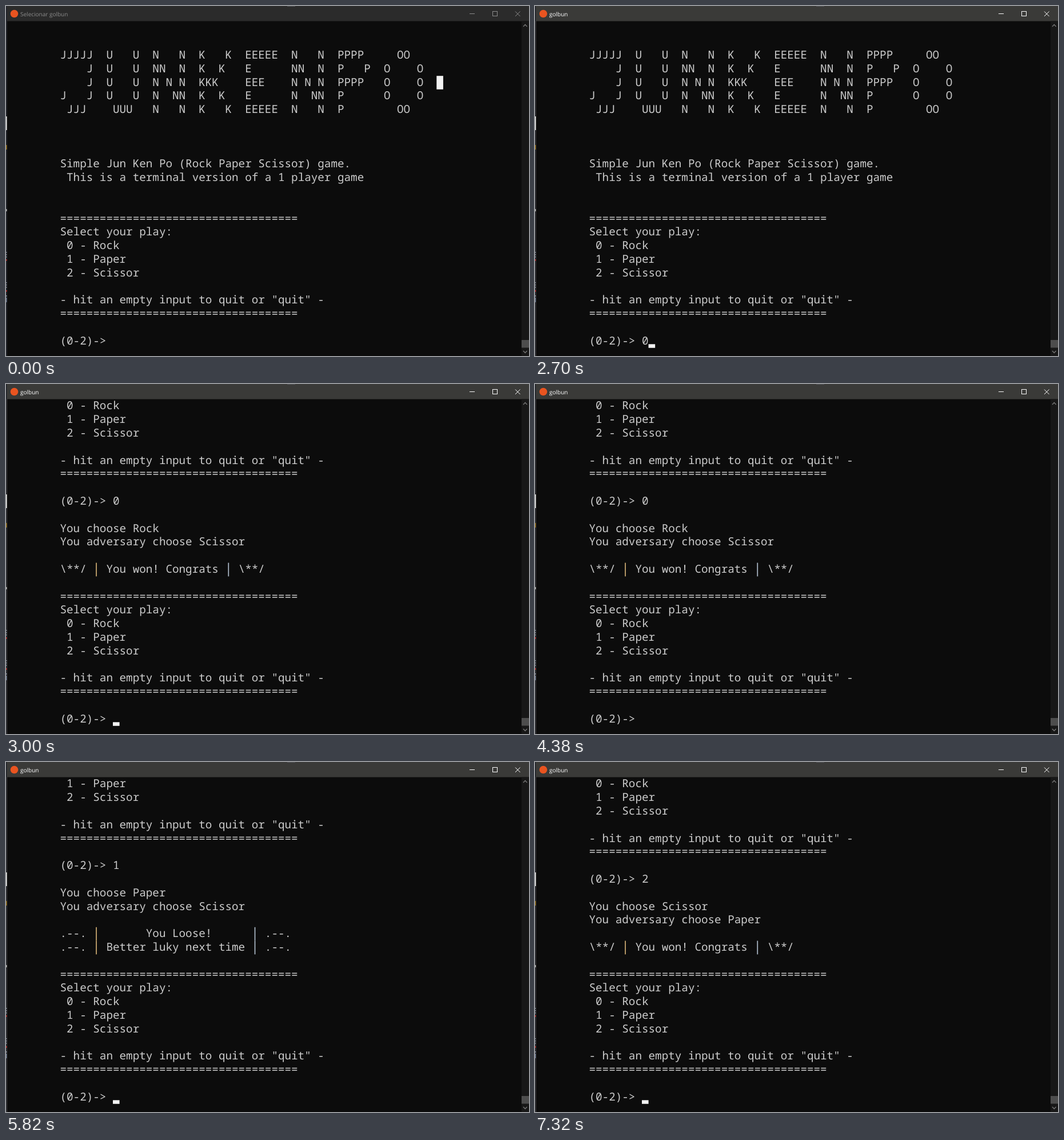
Write an HTML page that moves like this. It is 915x612 px and loops after 8000 ms.

```html
<!DOCTYPE html>
<html lang="en">
<head>
<meta charset="utf-8">
<title>Terminal game</title>
<style>
  html, body { margin: 0; width: 100%; height: 100%; overflow: hidden; background: #0c0c0c; }
  svg { display: block; width: 915px; height: 612px; }
  text { white-space: pre; text-rendering: geometricPrecision; }
  #rows text { font: 19.27px "Noto Sans Mono", monospace; fill: #ccc; }
  #title { font: 10px "Open Sans", sans-serif; }
</style>
</head>
<body>
<svg viewBox="0 0 915 612">
  <rect width="915" height="612" fill="#0c0c0c"/>
  <rect id="bar" width="915" height="26.5"/>
  <path d="M492 .5H506" stroke="#55565a"/>
  <circle cx="14.5" cy="13.5" r="6.8" fill="#e95420"/>
  <text id="title" x="25" y="17.6"></text>
  <g id="buttons" fill="none">
    <path d="M811 13.5H820"/>
    <rect x="851.5" y="9.5" width="8" height="8"/>
    <path d="M891 9.5L899.5 18M899.5 9.5L891 18"/>
  </g>

  <rect x="902" y="26.5" width="13" height="585.5" fill="#171717"/>
  <rect x="902" y="584" width="13" height="13.5" fill="#4d4d4d"/>
  <path d="M905 36L908.3 32.5L911.6 36M905 603L908.3 606.5L911.6 603" fill="none" stroke="#777" stroke-width="1.3"/>

  <rect width="1.5" height="612" fill="#20222b"/>
  <rect id="edge" x="1" y="26" width="1" height="586"/>
  <g id="behind"></g>

  <g id="rows"></g>
  <rect id="block" x="753.3" y="122.2" width="11.6" height="23.6" fill="#f2f2f2"/>
  <rect id="caret" y="591.3" width="11.6" height="6.5" fill="#f2f2f2"/>
  <path id="mouse" d="M.5 .5V10.2L2.7 8.2L4.2 11.6L5.8 10.9L4.3 7.7H7.2Z" fill="#fff" stroke="#000" stroke-width=".6"/>
</svg>
<script>
const NS = "http://www.w3.org/2000/svg";
const LOOP = 8000, COLS = 11.562, LINE = 23.8, LEFT = 2, TOP = 27, ROWS = 24, INDENT = 8;
const $ = id => document.getElementById(id);

function add(parent, tag, attrs) {
  const el = document.createElementNS(NS, tag);
  for (const k in attrs) el.setAttribute(k, attrs[k]);
  return parent.appendChild(el);
}
const show = (id, on) => $(id).setAttribute("visibility", on ? "visible" : "hidden");
const colX = c => LEFT + c * COLS;

// slivers of the window behind, along the left edge: [y, height, colour]
[[193, 24, "#f0f0f0"], [243, 8, "#9a7420"], [355, 4, "#b8b8b8"],
 [430, 1.5, "#8a93a5"], [434, 1.5, "#8a93a5"], [438, 1.5, "#8a93a5"], [443, 2.5, "#d03030"],
 [483, 1.5, "#8a93a5"], [487, 1.5, "#8a93a5"], [491, 1.5, "#8a93a5"], [497, 2.5, "#d03030"],
 [506, 2, "#8a93a5"], [510, 8, "#6f7c94"]
].forEach(([y, height, fill]) => add($("behind"), "rect", { x: 0, y, width: 1.5, height, fill }));

const rule = "=".repeat(36);
const intro = ["", "",
  "JJJJJ  U   U  N   N  K   K  EEEEE  N   N  PPPP     OO",
  "    J  U   U  NN  N  K  K   E      NN  N  P   P  O    O",
  "    J  U   U  N N N  KKK    EEE    N N N  PPPP   O    O",
  "J   J  U   U  N  NN  K  K   E      N  NN  P      O    O",
  " JJJ    UUU   N   N  K   K  EEEEE  N   N  P        OO",
  "", "", "",
  "Simple Jun Ken Po (Rock Paper Scissor) game.",
  " This is a terminal version of a 1 player game",
  "", ""];
const menu = [rule, "Select your play:", " 0 - Rock", " 1 - Paper", " 2 - Scissor", "",
  "- hit an empty input to quit or \"quit\" -", rule, "", "(0-2)-> "];
const won = ["\\**/ | You won! Congrats | \\**/"];
const lost = [".--. |       You Loose!      | .--.", ".--. | Better luky next time | .--."];

const typed = (log, key) => [...log.slice(0, -1), log[log.length - 1] + key];
const result = (log, mine, other, banner) =>
  [...log, "", "You choose " + mine, "You adversary choose " + other, "", ...banner, "", ...menu];

const start = [...intro, ...menu];
const rock = typed(start, "0");
const round2 = result(rock, "Rock", "Scissor", won);
const paper = typed(round2, "1");
const round3 = result(paper, "Paper", "Scissor", lost);
const scissor = typed(round3, "2");
const round4 = result(scissor, "Scissor", "Paper", won);

const views = [[0, start], [2700, rock], [2940, [...rock, ""]], [3000, round2],
  [5580, paper], [5820, round3], [7140, scissor], [7320, round4]];
const blinks = [1200, 1560, 1980, 2340, 2700, 3600, 4020, 4380, 4800, 5160, 5580, 6420, 6840];

let shown;
function drawLog(log) {
  if (log === shown) return;
  shown = log;
  const rows = $("rows");
  rows.textContent = "";
  log.slice(-ROWS).forEach((line, r) => {
    const y = TOP + r * LINE;
    const pad = line.length - line.trimStart().length;
    const t = add(rows, "text", { x: colX(INDENT + pad), y: y + 17.3 });
    t.textContent = line.trim().replace(/[| ]/g, "\u00a0");
    [line.indexOf("|"), line.lastIndexOf("|")].forEach((c, i) => {
      if (c >= 0) add(rows, "rect", {
        x: colX(INDENT + c + .5) - .9, y, width: 1.7, height: LINE, fill: i ? "#aebccb" : "#d0ae74"
      });
    });
  });
  const last = log[log.length - 1];
  $("caret").setAttribute("x", colX(last ? INDENT + last.length : 0));
}

function drawMouse(t) {
  show("mouse", t >= 300 && t < 1320);
  const step = Math.floor(t / 60) * 60;
  const p = Math.min(1, Math.max(0, (step - 300) / 720));
  const e = Math.sin(p * Math.PI / 2);
  const drop = t < 1140 ? 0 : t < 1260 ? 12 : 20;
  $("mouse").setAttribute("transform", `translate(${41 + 342 * e} ${570 * e + drop})`);
}

function render(t) {
  const active = t >= 1140, selecting = t < 2700;
  const ink = active ? "#fff" : "#8b8b8b";
  $("bar").setAttribute("fill", active ? "#3a3a38" : "#2b2b2b");
  $("edge").setAttribute("fill", active ? "#3f3f3e" : "#24252a");
  $("title").setAttribute("fill", ink);
  $("title").textContent = (selecting ? "Selecionar " : "") + "golbun";
  $("buttons").setAttribute("stroke", ink);
  show("block", selecting);
  show("caret", blinks.filter(b => b <= t).length % 2);
  drawLog(views.filter(v => v[0] <= t).pop()[1]);
  drawMouse(t);
}

let begin;
function tick(now) {
  if (begin === undefined) begin = now;
  render(Math.max(0, now - begin) % LOOP);
  requestAnimationFrame(tick);
}
render(0);
requestAnimationFrame(tick);
</script>
</body>
</html>
```
